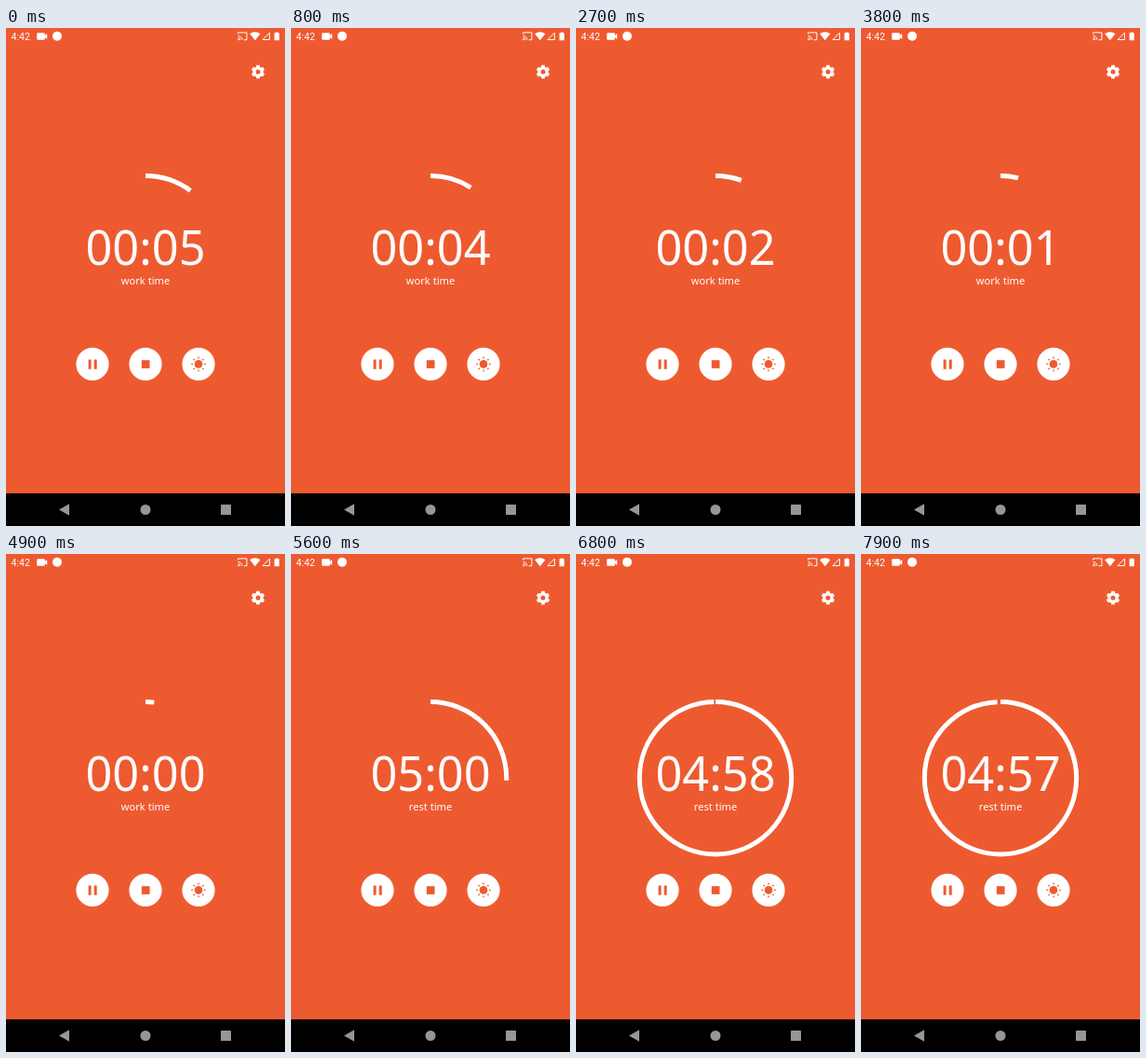
These frames come from a looping animation (300 by 534 pixels, 8 s). An HTML page:

```html
<!DOCTYPE html>
<html lang="en">
<head>
<meta charset="utf-8">
<title>Work timer</title>
<style>
  html, body { margin: 0; width: 100%; height: 100%; overflow: hidden; background: #ee5a2f; }
  svg { display: block; width: 100vw; height: 100vh; }
  .clock { font: 50.5px "Noto Sans", "Open Sans", sans-serif; }
  .label { font: 11.1px "Noto Sans", "Open Sans", sans-serif; }
  .status { font: 10.5px Roboto, sans-serif; }
</style>
</head>
<body>
<svg viewBox="0 0 300 534" fill="#fff">
  <rect width="300" height="534" fill="#ee5a2f"/>

  <!-- status bar -->
  <text class="status" x="5.6" y="12.8">4:42</text>
  <path d="M34.2 5.2h6.6a1 1 0 0 1 1 1v1.9l2.4-2.2v6.2l-2.4-2.2v1.9a1 1 0 0 1-1 1h-6.6a1 1 0 0 1-1-1v-5.6a1 1 0 0 1 1-1z"/>
  <circle cx="55" cy="8.8" r="5"/>
  <g fill="none" stroke="#fff" stroke-width="1">
    <path d="M249.6 6.6v-1.7h9.3v7.8h-3.2M249.6 8.4a4.3 4.3 0 0 1 4.3 4.3M249.6 10.4a2.3 2.3 0 0 1 2.3 2.3"/>
    <path d="M276 12.5h7.4v-7.4z"/>
  </g>
  <circle cx="250" cy="12.4" r=".8"/>
  <path d="M267.8 13.2L262.2 6.3a9 9 0 0 1 11.2 0z"/>
  <path d="M290.2 4.4h2v.9h1.6v7.9h-5.2v-7.9h1.6z"/>

  <g transform="translate(271 47)">
    <circle r="4" fill="none" stroke="#fff" stroke-width="3"/>
    <g id="teeth"></g>
  </g>

  <!-- dial -->
  <circle id="arc" cx="150" cy="240.3" r="81.7" pathLength="360" fill="none" stroke="#fff"
    stroke-width="5" transform="rotate(-90 150 240.3)"/>
  <text id="clock" class="clock" x="150" y="254" text-anchor="middle"></text>
  <text id="label" class="label" x="150" y="275" text-anchor="middle"></text>

  <!-- buttons -->
  <circle cx="93" cy="360.4" r="17.6"/>
  <circle cx="150" cy="360.4" r="17.6"/>
  <circle cx="207" cy="360.4" r="17.6"/>
  <g fill="#ee5a2f">
    <path d="M88.6 355.5h3v10.2h-3zM94.7 355.5h3v10.2h-3z"/>
    <rect x="145.8" y="356.2" width="8.7" height="8.7"/>
    <g transform="translate(207 360.4)">
      <circle r="4.3"/>
      <g id="rays"></g>
    </g>
  </g>

  <!-- navigation bar -->
  <rect y="499" width="300" height="35" fill="#000"/>
  <g fill="#969696">
    <path d="M57 516.5l11-6.2v12.4z"/>
    <circle cx="150" cy="516.5" r="5.5"/>
    <rect x="231" y="511" width="11" height="11" rx=".6"/>
  </g>
</svg>
<script>
  const LOOP = 8000, STEP = 100;
  const get = id => document.getElementById(id);
  const arc = get('arc'), clock = get('clock'), label = get('label');

  // [time in ms, sweep in degrees]
  const sweeps = [
    [-550, 39.9], [450, 33.7], [1450, 27.7], [2400, 21.7], [3200, 15.8], [3350, 15.8],
    [4400, 9.9], [5270, 4.6], [6270, 360], [6800, 358.8], [7250, 358.8],
    [7300, 358.6], [7400, 358.6], [7900, 357.5], [LOOP, 357.5]
  ];
  // [time in ms, shown time]
  const ticks = [
    [0, '00:05'], [500, '00:04'], [1500, '00:03'], [2400, '00:02'], [3400, '00:01'],
    [4400, '00:00'], [5300, '05:00'], [6100, '04:59'], [6600, '04:58'], [7500, '04:57']
  ];
  const REST = 5300;

  const ease = x => (1 - Math.cos(Math.PI * x)) / 2;

  function sweepAt(t) {
    const i = sweeps.findIndex(k => k[0] > t);
    const [t0, a] = sweeps[i - 1], [t1, b] = sweeps[i];
    return a + (b - a) * ease((t - t0) / (t1 - t0));
  }

  function spokes(id, count, d) {
    get(id).innerHTML = Array.from({ length: count }, (_, i) =>
      `<path d="${d}" transform="rotate(${i * 360 / count})"/>`).join('');
  }

  function draw(time) {
    const t = Math.floor((time % LOOP) / STEP) * STEP;
    arc.setAttribute('stroke-dasharray', `${sweepAt(t)} 400`);
    clock.textContent = ticks.filter(k => k[0] <= t).pop()[1];
    label.textContent = t < REST ? 'work time' : 'rest time';
  }

  spokes('teeth', 6, 'M-2.4 -4.6L-1.6 -7.2H1.6L2.4 -4.6z');
  spokes('rays', 8, 'M-.7 -7.8H.7V-6H-.7z');

  const start = performance.now();
  function frame() {
    draw(performance.now() - start);
    requestAnimationFrame(frame);
  }
  frame();
</script>
</body>
</html>
```
